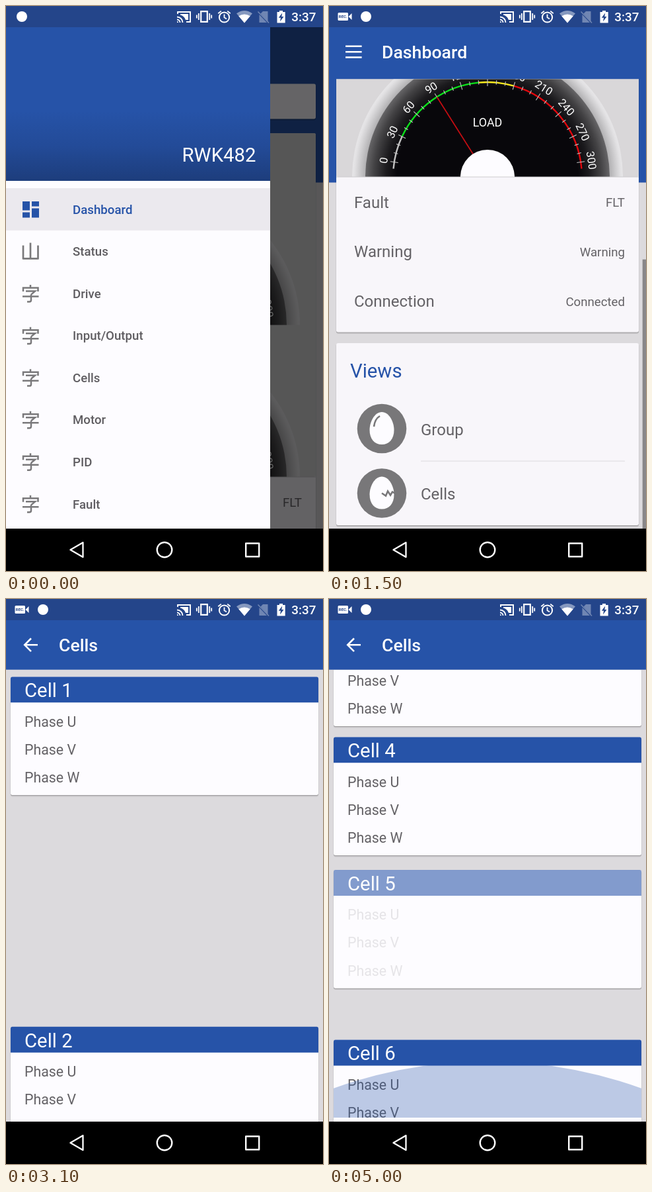
These frames come from a looping animation (480 px wide and 853 px high, 5.1 s). An HTML page:

```html
<!DOCTYPE html>
<html lang="en">
<head>
<meta charset="utf-8">
<title>Drive panel</title>
<style>
html, body { margin: 0; width: 100%; height: 100%; overflow: hidden; background: #000; }
svg { display: block; width: 100vw; height: 100vh; font-family: Roboto, sans-serif; }
</style>
</head>
<body>
<svg id="stage" viewBox="0 0 480 853" preserveAspectRatio="none"></svg>
<script>
const LOOP = 5100, STEP = 100;
const BLUE = '#2653a8', PAGE = '#dcdadd', WHITE = '#fdfcff', BODY = '#f8f6fa', GREY = '#646266';
const MODEL = 'RWK482';
const SCROLL_MAX = 453, LIST_MAX = 494;

const stage = document.getElementById('stage');
const $ = id => document.getElementById(id);
const clamp = v => Math.max(0, Math.min(1, v));
const ramp = (t, from, to) => clamp((t - from) / (to - from));
const smooth = u => u * u * (3 - 2 * u);

const rect = (x, y, w, h, fill, more = '') =>
  `<rect x="${x}" y="${y}" width="${w}" height="${h}" fill="${fill}" ${more}/>`;
const text = (x, y, str, size, fill, more = '') =>
  `<text x="${x}" y="${y}" font-size="${size}" fill="${fill}" ${more}>${str}</text>`;
const line = (d, color, width, more = '') =>
  `<path d="${d}" fill="none" stroke="${color}" stroke-width="${width}" ${more}/>`;
const shape = (d, fill, more = '') => `<path d="${d}" fill="${fill}" ${more}/>`;
const END = 'text-anchor="end"', MID = 'text-anchor="middle"', MEDIUM = 'font-weight="500"';

const card = (x, y, w, h, fill) =>
  rect(x, y + 2.4, w, h, '#000', 'rx="3" opacity=".1"') +
  rect(x - .3, y + 1, w + .6, h, '#000', 'rx="3" opacity=".2"') +
  rect(x, y, w, h, fill, 'rx="2.7"');

// Dial: angles in degrees from straight up, 16.2 degrees per 30 units
const dialAngle = value => (value - 150) * .54;
function polar(r, deg) {
  const a = deg * Math.PI / 180;
  return (r * Math.sin(a)).toFixed(2) + ' ' + (-r * Math.cos(a)).toFixed(2);
}
const arc = (from, to, color) =>
  line(`M${polar(143, from)}A143 143 0 0 1 ${polar(143, to)}`, color, 2.4);

function gauge(cy, label, value) {
  let marks = '';
  for (let v = 0; v <= 300; v += 10) {
    const a = dialAngle(v), major = v % 30 === 0;
    marks += line(`M${polar(major ? 137 : 140, a)}L${polar(major ? 149 : 146.5, a)}`, '#c4c4c4', 1.1);
    if (major) marks += text(0, -153.5, v, 16.4, '#fff', `${MID} transform="rotate(${a})"`);
  }
  const a = dialAngle(value);
  return `<g transform="translate(240 ${cy})"><g clip-path="url(#half)">
    <circle r="205" fill="url(#rim)"/><circle r="185" fill="url(#face)"/>
    ${arc(-85, dialAngle(30), '#c2c2c2')}${arc(dialAngle(30), dialAngle(140), '#0be01a')}
    ${arc(dialAngle(140), dialAngle(180), '#f8ea1c')}${arc(dialAngle(180), 85, '#e3060c')}
    ${marks}${text(0, -76, label, 17.9, '#fff', MID)}
    ${line(`M0 0L${polar(143, a)}`, '#c80d12', 1.7)}
    <circle r="41" fill="${WHITE}"/></g></g>`;
}

const infoRow = (y, name, value) =>
  text(38, y, name, 24, GREY) + text(448, y - 1.5, value, 18.67, GREY, END);

const egg = (cy, detail) => `<g transform="translate(80 ${cy})"><circle r="37.3" fill="#787779"/>
  ${shape('M0-25C11-25 18.5-10 18.5 2C18.5 16 11 24 0 24S-18.5 16-18.5 2C-18.5-10-11-25 0-25Z', WHITE)}
  ${line(detail, '#787779', 2.6)}</g>`;

function dashboard() {
  return rect(0, 0, 480, 853, PAGE) + rect(0, 0, 480, 266.5, BLUE) +
    `<g clip-path="url(#scrollView)"><g id="content">
      ${card(11, 117.5, 458, 53, WHITE)}
      ${text(240, 152, '192.168.2.200', 21.33, '#2b2a2d', MID)}
      ${card(11, 192, 458, 753.5, BODY)}
      ${rect(11, 192, 458, 519, '#d9d7d9', 'rx="2.7"')}
      ${text(32, 244, 'Status', 29.33, BLUE)}
      ${gauge(481.5, 'SPEED', 180)}${gauge(711, 'LOAD', 90)}
      ${rect(11, 710.6, 458, .9, '#c9c7ca')}
      ${infoRow(757.5, 'Fault', 'FLT')}${infoRow(832.3, 'Warning', 'Warning')}
      ${infoRow(907, 'Connection', 'Connected')}
      ${card(11, 962, 458, 275, BODY)}
      ${text(32, 1014, 'Views', 29.33, BLUE)}
      ${egg(1091, 'M-12-3C-11-11-8-16-3-19')}
      ${text(139, 1101, 'Group', 24, GREY)}
      ${rect(139, 1139.5, 309, 1.2, '#e2e0e4')}
      ${egg(1188.5, 'M0 0L6 4L9-3L13 3L16-2L21 1')}
      ${text(139, 1198, 'Cells', 24, GREY)}
      <g clip-path="url(#cellsRow)"><circle id="ripple" cx="240" cy="1189" fill="#000"/></g>
    </g></g>
    <rect id="bar" x="474.7" width="5.3" height="406.4" fill="#000" fill-opacity=".38"/>
    <g id="burger">${line('M25 60.8h24.6M25 69.3h24.6M25 77.6h24.6', '#fff', 2.5)}</g>
    ${text(80, 79.3, MODEL, 26.67, '#fff', `${MEDIUM} id="title"`)}`;
}

const glyphs = {
  board: shape('M-12-12h11v13.5h-11zM-12 4.5h11v8h-11zM2-12h11v7.5h-11zM2-1.5h11v14h-11z', BLUE),
  hill: line('M-11-9V12M0-13V11M11.5-9V12M-11 10.8H11.5', '#7a797b', 2.7),
  word: line('M0-13v4M-11-3v-5.5H11.5v5.5M-7-3.5H7L1 1.5M-12 4.5H12.5M1 1.5V10q0 2.4-2.4 2.4H-5', '#7a797b', 2.5)
};

function drawer() {
  const names = ['Dashboard', 'Status', 'Drive', 'Input/Output', 'Cells', 'Motor', 'PID', 'Fault'];
  const items = names.map((name, i) => {
    const y = 307 + i * 63.55, glyph = ['board', 'hill'][i] || 'word';
    return `<g transform="translate(37 ${y})">${glyphs[glyph]}</g>` +
      text(101, y + 6.7, name, 18.67, i ? '#5f5d61' : BLUE, MEDIUM);
  }).join('');
  return `<rect id="scrim" width="480" height="853"/><g id="drawer">
    ${rect(0, 0, 400, 853, WHITE)}${rect(0, 0, 400, 264, 'url(#banner)')}
    ${text(378.5, 235, MODEL, 29.33, '#fff', END)}
    ${rect(0, 275, 400, 63.8, '#ebe9ee')}
    <rect id="press" y="275" width="400" height="63.8"/>${items}</g>`;
}

function cellCard(n) {
  const phases = ['U', 'V', 'W'].map((p, i) => text(28, 192.5 + i * 42.2, 'Phase ' + p, 21.33, GREY)).join('');
  return `<g id="cell${n}">${card(7, 117.5, 466, 178.5, WHITE)}
    <g class="head">${shape('M7 156.3V120q0-2.6 2.6-2.6H470.4q2.6 0 2.6 2.6V156.3Z', BLUE)}</g>
    ${text(28, 148.3, 'Cell ' + n, 29.33, '#fff')}<g class="rows">${phases}</g></g>`;
}

function cellsPage() {
  return `<g id="cells">${rect(0, 0, 480, 853, PAGE)}
    <g clip-path="url(#listView)">${[1, 2, 3, 4, 5, 6].map(cellCard).join('')}
      <g clip-path="url(#glowBox)"><circle id="glow" cx="240" r="686" fill="${BLUE}" opacity=".3"/></g></g>
    ${rect(0, 0, 480, 106.7, BLUE)}
    ${line('M48 69.3H28.5M38 59.5L28.2 69.3L38 79.1', '#fff', 2.6)}
    ${text(80, 79.3, 'Cells', 26.67, '#fff', MEDIUM)}</g>`;
}

function systemBars() {
  const w = '#fff';
  return rect(0, 0, 480, 32, '#24458a') +
    `<g id="rec">${rect(13.5, 10, 15.5, 12, w, 'rx="1.5"')}${shape('M29.5 16L34.5 11V21Z', w)}
      ${text(21.3, 18.4, 'REC.', 6, '#24458a', `${MID} font-weight="700"`)}</g>
    <circle id="note" cy="16" r="8" fill="#fff"/>` +
    // cast
    line('M260 12V9H279V24H273', w, 1.9) + shape('M264 12H276V21H272Q270 15 264 13.5Z', w) +
    line('M259 16.5A8.5 8.5 0 0 1 267.5 25M259 20.5A4.5 4.5 0 0 1 263.5 25', w, 1.8) + shape('M259 23a2 2 0 0 1 2 2h-2z', w) +
    // vibrate
    line('M295.2 8.2H304.8V23.8H295.2Z', w, 2.2) + line('M291.8 11V21M288.8 13.5V18.5M308.2 11V21M311.2 13.5V18.5', w, 1.8) +
    // alarm
    `<circle cx="330.5" cy="17" r="7.6" fill="none" stroke="#fff" stroke-width="2"/>` +
    line('M330.5 12.5V17.3L334 19.5M321.3 11.3L325.8 7.6M339.7 11.3L335.2 7.6', w, 1.8) +
    // wifi
    shape('M349 11.3Q361 2.5 373 11.3L361 25.5Z', w, 'opacity=".45"') + shape('M352.3 15.2Q361 9.8 369.7 15.2L361 25.5Z', w) +
    // no sim
    `<g opacity=".35">${shape('M389 8H396.5V24L385.5 11.5ZM383.5 13L395 25H383.5Z', w)}${line('M381.5 8.5L398 25.5', w, 1.5)}</g>` +
    // battery
    shape('M410.5 9H414V7H419V9H422.7V25.5H410.5Z', w) + shape('M418.2 10.5L412.8 17.8H416L415 23.5L420.5 16H417.3Z', '#24458a') +
    text(469.5, 23, '3:37', 18.9, w, `${END} ${MEDIUM}`) +
    rect(0, 789, 480, 64, '#000') +
    line('M97.5 821L116.5 810V832Z', w, 2.3, 'stroke-linejoin="round"') +
    `<circle cx="240" cy="821" r="11.3" fill="none" stroke="#fff" stroke-width="2.4"/>` +
    line('M363.2 811.2H383.2V831.2H363.2Z', w, 2.4, 'stroke-linejoin="round"');
}

const stop = (at, color) => `<stop offset="${at}" stop-color="${color}"/>`;
const radial = (id, r, stops) =>
  `<radialGradient id="${id}" gradientUnits="userSpaceOnUse" cx="0" cy="0" r="${r}">${stops}</radialGradient>`;
const clip = (id, x, y, w, h) => `<clipPath id="${id}">${rect(x, y, w, h, '#000')}</clipPath>`;

stage.innerHTML = `<defs>
  ${radial('rim', 205, stop(.9, '#b0afb1') + stop(.95, '#cfced0') + stop(.985, '#e3e2e4') + stop(1, '#e6e5e7'))}
  ${radial('face', 185, stop(.74, '#08070b') + stop(.83, '#1c1b1e') + stop(.93, '#434244') + stop(1, '#666567'))}
  <linearGradient id="banner" x1="0" y1="0" x2="0" y2="1">${stop(.6, BLUE) + stop(.8, '#234b98') + stop(1, '#1d3d7c')}</linearGradient>
  ${clip('half', -229, -206, 458, 206)}${clip('scrollView', 0, 110.5, 480, 679)}
  ${clip('cellsRow', 11, 1141, 458, 96)}${clip('listView', 0, 106.7, 480, 683)}
  ${clip('glowBox', 7, 600, 466, 183)}
</defs>
<g id="home">${dashboard()}${drawer()}</g>${cellsPage()}${systemBars()}`;

const set = (id, attrs) => { for (const k in attrs) $(id).setAttribute(k, attrs[k]); };
const move = (id, x, y) => set(id, { transform: `translate(${x.toFixed(2)} ${y.toFixed(2)})` });

const settle = [3100, 3450, 3800, 4150, 5076, 5192];

function drawHome(t) {
  const open = Math.pow(1 - ramp(t, 500, 1185), 5);
  move('drawer', -400 * (1 - open), 0);
  set('scrim', { opacity: .6 * open });
  set('press', { opacity: t >= 400 ? .06 * (1 - ramp(t, 500, 800)) : 0 });
  set('burger', { transform: `rotate(${180 * open} 37.3 69.3)` });
  $('title').textContent = t < 1100 ? MODEL : 'Dashboard';

  const u = ramp(t, 960, 1500), scrolled = 1 - (1 - u) * (1 - u);
  move('content', 0, -SCROLL_MAX * scrolled);
  set('bar', { y: 111 + 271.6 * scrolled, opacity: u > 0 ? 1 - ramp(t, 1850, 2100) : 0 });

  const spread = ramp(t, 1850, 2250);
  set('ripple', { r: 260 * spread, opacity: .1 * (1 - ramp(t, 2150, 2400)) });
}

function drawCells(t) {
  const enter = ramp(t, 2440, 2700);
  $('cells').style.display = enter > 0 ? '' : 'none';
  set('cells', { opacity: clamp(enter * 1.4) });
  move('cells', 0, 66 * Math.pow(1 - enter, 2));

  const scroll = LIST_MAX * smooth(ramp(t, 4540, 4960));
  settle.forEach((end, i) => {
    const left = Math.max(0, end - t) / 1000;
    const id = 'cell' + (i + 1);
    $(id).style.display = left > .38 ? 'none' : '';
    move(id, 0, 195 * i - scroll + 5500 * Math.pow(left, 2.67));
  });
  $('cell5').querySelector('.head').setAttribute('opacity', ramp(t, 4850, 5113));
  $('cell5').querySelector('.rows').setAttribute('opacity', ramp(t, 4960, 5230));

  const glow = ramp(t, 4860, 5000);
  set('glow', { cy: 783 - 85 * glow + 686 });
}

function draw(t) {
  $('rec').style.display = t < 100 ? 'none' : '';
  set('note', { cx: t < 100 ? 24 : 56 });
  drawHome(t);
  drawCells(t);
}

function tick(now) {
  draw(Math.floor(now % LOOP / STEP) * STEP);
  requestAnimationFrame(tick);
}
draw(0);
requestAnimationFrame(tick);
</script>
</body>
</html>
```
